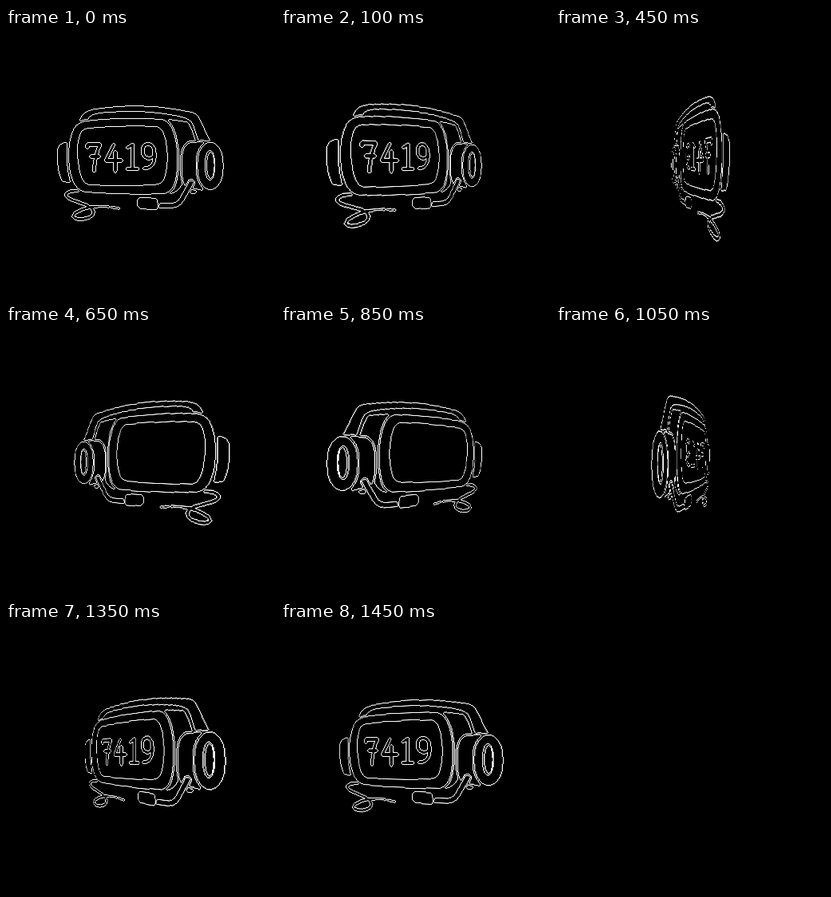
Recreate the animation shown at these times as an HTML page without scripts. Size 337 by 337 pixels, loop 1.5 s.

```html
<!DOCTYPE html>
<html lang="en">
<head>
<meta charset="utf-8">
<title>Spinning headset outline</title>
<style>
  html, body { margin: 0; width: 100%; height: 100%; overflow: hidden; background: #000; }
  .stage { position: relative; width: 337px; height: 337px; overflow: hidden; background: #000; filter: url(#crisp); }
  .model { display: block; width: 337px; height: 337px; will-change: transform; animation: spin 1.5s steps(30, end) infinite; }
  .part { fill: #fff; stroke: #000; stroke-width: 5.6; stroke-linejoin: round; paint-order: stroke; }
  .tube { fill: none; stroke: #fff; stroke-linecap: round; stroke-linejoin: round; }
  .digits { stroke-width: 3; animation: digits 1.5s step-end infinite; }
  @keyframes spin {
    from { transform: perspective(290px) rotateY(0deg); }
    to { transform: perspective(290px) rotateY(360deg); }
  }
  /* the readout is blank while the back is turned */
  @keyframes digits {
    0% { visibility: visible; }
    32% { visibility: hidden; }
    69.5% { visibility: visible; }
  }
</style>
</head>
<body>
<svg width="0" height="0" style="position:absolute">
  <!-- keeps only a one pixel line around every white area -->
  <filter id="outline" filterUnits="userSpaceOnUse" x="0" y="0" width="337" height="337" color-interpolation-filters="sRGB">
    <feColorMatrix values="0 0 0 0 1  0 0 0 0 1  0 0 0 0 1  1 0 0 0 0"/>
    <feComponentTransfer result="area"><feFuncA type="discrete" tableValues="0 1"/></feComponentTransfer>
    <feConvolveMatrix order="3" kernelMatrix="0 1 0 1 1 1 0 1 0" divisor="1" edgeMode="none" preserveAlpha="false"/>
    <feComposite operator="out" in2="area" result="line"/>
    <feFlood flood-color="#000"/>
    <feComposite operator="over" in="line"/>
  </filter>
  <!-- sharpens the lines after projection -->
  <filter id="crisp" x="0" y="0" width="100%" height="100%" color-interpolation-filters="sRGB">
    <feComponentTransfer>
      <feFuncR type="linear" slope="1.8" intercept="-.3"/>
      <feFuncG type="linear" slope="1.8" intercept="-.3"/>
      <feFuncB type="linear" slope="1.8" intercept="-.3"/>
    </feComponentTransfer>
  </filter>
</svg>
<div class="stage">
  <svg class="model" viewBox="0 0 337 337" role="img" aria-label="Headset with a screen reading 7419">
    <g filter="url(#outline)">
      <rect width="337" height="337"/>
      <!-- left pad -->
      <path class="part" d="M76 144Q66 144 65 153Q64 180 71 192L80 193Q74 170 76 144Z"/>
      <!-- cable -->
      <g class="tube">
        <path stroke-width="2.6" d="M92 204C78 203 71 208 78 213C88 219 109 221 109.500 231C109 239 92 241 86 238C80 233 95 225 113 224"/>
        <path stroke-width="1.300" d="M113 224Q122 222.500 129 224M132 224.500L142 226"/>
      </g>
      <!-- headband -->
      <path class="part" d="M92 118C95 108 100 104 112 102C145 97 185 96 226 105Q238 106 241 112L255 141L242 142L236 124Q233 115 224 112C200 105 150 101 112 107Q104 109 101 117Z"/>
      <!-- side of the body -->
      <path class="part" d="M204 115L226 118Q231 120 237 142L221 160V195Q214 206 206 207Z"/>
      <!-- ear cup -->
      <path class="part" d="M230 202L239 204L236 207L229 206Z"/>
      <path class="part" d="M247 143L231 144Q222 147 221 162Q219 188 225 198L246 203Z"/>
      <!-- screen frame -->
      <path class="part" fill-rule="evenodd" d="M100 117Q150 111 195 115Q207 117 212 140Q217 165 212 190Q209 205 198 207Q150 209 100 205Q84 203 80 175Q77 150 83 132Q87 119 100 117Z
        M103 125Q145 121 188 123Q198 125 201 143Q205 165 200 185Q197 196 186 197Q145 199 104 197Q94 194 91 175Q87 152 91 137Q94 126 103 125Z"/>
      <!-- ear ring -->
      <rect class="part" x="240.500" y="143.500" width="31" height="58.500" rx="15.500" ry="25"/>
      <ellipse cx="255.500" cy="172" rx="7" ry="19"/>
      <ellipse cx="256.300" cy="172" rx="4.300" ry="16" fill="#fff"/>
      <!-- microphone -->
      <g class="tube">
        <path stroke="#000" stroke-width="10" d="M232 194L220 215Q216 222 207 222.500L190 223"/>
        <path stroke-width="5" d="M232 194L220 215Q216 222 207 222.500L190 223"/>
      </g>
      <path class="part" d="M169 212.500L188 214Q191 220 189 227.500L169 226Q164 223 164.500 218Q165 213 169 212.500Z"/>
      <!-- readout -->
      <g class="tube digits">
        <path d="M102 150V146H118Q111 160 110.500 179M106 161H117"/>
        <path d="M135 146L125 166H145M137 155V179.500"/>
        <path d="M152 150L158.500 146.500V176M152 176.500H165"/>
        <path d="M186 156C186 142 171 142 171 154C171 166 186 166 186 156Q188 175 173 176"/>
      </g>
    </g>
  </svg>
</div>
</body>
</html>
```
